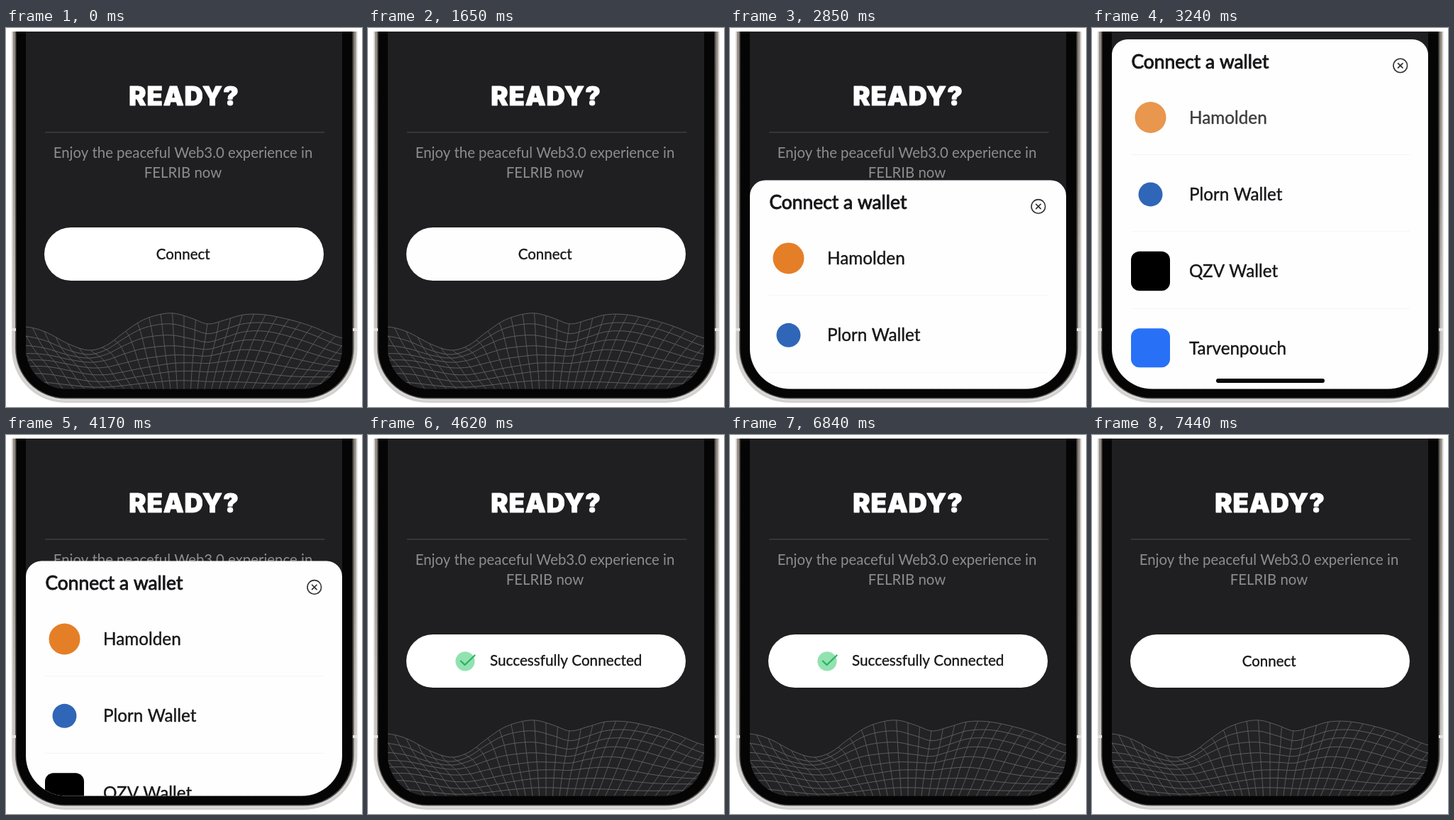
Write an HTML page with a canvas that moves like this. It is 502x534 px and loops after 7530 ms.

```html
<!DOCTYPE html>
<html lang="en">
<head>
<meta charset="utf-8">
<title>Connect a wallet</title>
<style>
html, body { margin: 0; width: 100%; height: 100%; overflow: hidden; background: #fff; }
canvas { display: block; width: 502px; height: 534px; }
</style>
</head>
<body>
<canvas id="stage"></canvas>
<script>
const W = 502, H = 534, LOOP = 7530;
const SANS = 'Lato, "Open Sans", sans-serif';
const canvas = document.getElementById('stage');
const dpr = window.devicePixelRatio || 1;
canvas.width = W * dpr;
canvas.height = H * dpr;
const c = canvas.getContext('2d');

const clamp = v => Math.min(1, Math.max(0, v));
const phase = (t, from, to) => clamp((t - from) / (to - from));
const smooth = p => p * p * (3 - 2 * p);
const mix = (a, b, p) => a + (b - a) * p;

function box(x, y, w, h, r, fill) {
  c.beginPath();
  c.roundRect(x, y, w, h, r);
  if (fill) { c.fillStyle = fill; c.fill(); }
}

function disc(x, y, r, fill) {
  c.beginPath();
  c.arc(x, y, r, 0, Math.PI * 2);
  c.fillStyle = fill;
  c.fill();
}

function line(points, color, width) {
  c.beginPath();
  points.forEach(([x, y]) => c.lineTo(x, y));
  c.strokeStyle = color;
  c.lineWidth = width;
  c.stroke();
}

// "extra" thickens the glyphs a little for in-between weights
function text(str, x, y, size, { color = '#17171a', align = 'left', extra = 0, weight = 400, family = SANS, spacing = 0 } = {}) {
  c.font = `${weight} ${size}px ${family}`;
  c.letterSpacing = spacing + 'px';
  c.textAlign = align;
  c.textBaseline = 'alphabetic';
  c.fillStyle = color;
  c.fillText(str, x, y);
  if (extra) {
    c.strokeStyle = color;
    c.lineWidth = extra;
    c.lineJoin = 'round';
    c.strokeText(str, x, y);
  }
  c.letterSpacing = '0px';
}

function faded(alpha, draw) {
  if (alpha <= 0) return;
  c.save();
  c.globalAlpha *= alpha;
  draw();
  c.restore();
}

const crest = [[-40, 420], [28, 421], [55, 428], [90, 446], [118, 454], [142, 447], [165, 430],
  [190, 413], [215, 404], [237, 402], [262, 409], [285, 417], [310, 411], [335, 404],
  [365, 404], [400, 411], [430, 420], [474, 437], [540, 450]];

function ridge(x) {
  let i = 1;
  while (i < crest.length - 3 && crest[i + 1][0] < x) i++;
  const [a, b, d, e] = crest.slice(i - 1, i + 3);
  const w = d[0] - b[0], s = clamp((x - b[0]) / w);
  const m0 = (d[1] - a[1]) / (d[0] - a[0]) * w;
  const m1 = (e[1] - b[1]) / (e[0] - b[0]) * w;
  const s2 = s * s, s3 = s2 * s;
  return (2 * s3 - 3 * s2 + 1) * b[1] + (s3 - 2 * s2 + s) * m0 + (3 * s2 - 2 * s3) * d[1] + (s3 - s2) * m1;
}

// u runs across the terrain, v from the crest down
function terrain(u, v) {
  const x = 28 + u * 446 + v * 62 * Math.cos(u * Math.PI);
  const bump = 5 * Math.sin(x / 36 + v * 4) * v * (1 - v) * 4;
  return [x, mix(ridge(x), 512, v) + bump];
}

function range(n, fn) {
  return Array.from({ length: n + 1 }, (_, i) => fn(i / n));
}

function drawTerrain() {
  const top = range(110, p => [28 + p * 446, ridge(28 + p * 446)]);
  c.beginPath();
  [...top, [474, 510], [28, 510]].forEach(([x, y]) => c.lineTo(x, y));
  c.fillStyle = '#232325';
  c.fill();
  range(8, v => line(range(120, p => terrain(mix(-0.2, 1.2, p), v)), '#656567', 0.9));
  range(38, p => line(range(20, v => terrain(mix(-0.2, 1.2, p), v)), '#5e5e60', 0.9));
}

function drawPhone() {
  const side = c.createLinearGradient(0, 5, 0, 528);
  side.addColorStop(0, '#91887f');
  side.addColorStop(0.4, '#a09a93');
  side.addColorStop(0.8, '#c6c3c0');
  side.addColorStop(1, '#dededf');
  box(8, 5, 487.5, 523, [0, 0, 76, 76], '#d3d1cf');
  box(10, 5, 483.5, 520, [0, 0, 74, 74], side);
  box(13, 5, 477.5, 517.5, [0, 0, 71, 71], '#55514d');
  box(14.5, 5, 474, 516, [0, 0, 69, 69], '#050505');
  c.fillStyle = '#e4e3e2';
  c.fillRect(8, 423, 6, 4);
  c.fillRect(489, 423, 6.5, 4);
}

function drawSuccess() {
  disc(137, 318.8, 13.6, '#92e2b0');
  c.lineCap = c.lineJoin = 'round';
  line([[131, 318.5], [136.5, 324], [150.5, 310.5]], '#2db366', 2.4);
  text('Successfully Connected', 172, 325, 20.7, { extra: 0.35 });
}

function drawButton(t) {
  const press = Math.sin(Math.PI * phase(t, 1650, 2280));
  const back = smooth(phase(t, 7080, 7440));
  const done = t < 3600 ? 0 : 1 - back;
  faded(1 - 0.4 * press, () => {
    box(54, 281, 394, 75, 37.5, '#fff');
    faded(1 - done, () => text('Connect', 249.7, 325.5, 20.5, { align: 'center', extra: 0.35 }));
    faded(done, drawSuccess);
  });
}

function drawHome(t) {
  c.fillStyle = '#1f1f21';
  c.fillRect(28, 5, 446, 504);
  drawTerrain();
  text('READY?', 251, 109, 36.5, {
    color: '#fff', align: 'center', weight: 900, family: 'Inter, "Open Sans", sans-serif', extra: 0.9, spacing: 0.8
  });
  line([[55, 147], [449.5, 147]], '#4c4c4e', 1);
  const soft = { color: '#8d8d8f', align: 'center' };
  text('Enjoy the peaceful Web3.0 experience in', 249.5, 183, 20.4, soft);
  text('FELRIB now', 249.5, 211, 20.4, soft);
  drawButton(t);
}

const wallets = [
  { name: 'Hamolden', icon: y => disc(82.5, y, 22, '#e57f27') },
  { name: 'Plorn Wallet', icon: y => disc(82.5, y, 17, '#2f66b8') },
  { name: 'QZV Wallet', icon: y => box(55, y - 28, 55, 55.5, 12, '#000') },
  { name: 'Tarvenpouch', icon: y => box(55, y - 28, 55, 55, 12, '#2871f7') }
];

function drawSheet(top, t) {
  c.save();
  c.translate(0, top);
  box(28, 0, 446, 540, [22, 22, 0, 0], '#fefefe');
  text('Connect a wallet', 55.5, 41, 26.4, { extra: 0.9 });
  c.beginPath();
  c.arc(434.8, 37, 9.8, 0, Math.PI * 2);
  c.strokeStyle = '#303033';
  c.lineWidth = 1.6;
  c.stroke();
  c.lineCap = 'round';
  line([[431.6, 33.8], [438, 40.2]], '#303033', 1.7);
  line([[438, 33.8], [431.6, 40.2]], '#303033', 1.7);
  const tap = Math.sin(Math.PI * phase(t, 3150, 3750));
  wallets.forEach(({ name, icon }, i) => {
    const y = 110 + i * 108.4;
    faded(i ? 1 : 1 - 0.4 * tap, () => {
      icon(y);
      text(name, 137, y + 8.5, 24.3, { extra: 0.4 });
    });
    if (i < 3) line([[55, y + 52.5], [448, y + 52.5]], '#f4f4f5', 1);
  });
  box(175, 478, 153, 6, 3, '#050505');
  c.restore();
}

function draw(t) {
  c.setTransform(dpr, 0, 0, dpr, 0, 0);
  c.fillStyle = '#fff';
  c.fillRect(0, 0, W, H);
  drawPhone();
  c.save();
  box(28, 5, 446, 503.5, [0, 0, 57, 57]);
  c.clip();
  drawHome(t);
  const open = smooth(phase(t, 2546, 3086)) - smooth(phase(t, 3964, 4504));
  if (open > 0) drawSheet(mix(508, 16, open), t);
  c.restore();
}

const start = performance.now();
function tick() {
  draw((performance.now() - start) % LOOP);
  requestAnimationFrame(tick);
}
tick();
</script>
</body>
</html>
```
